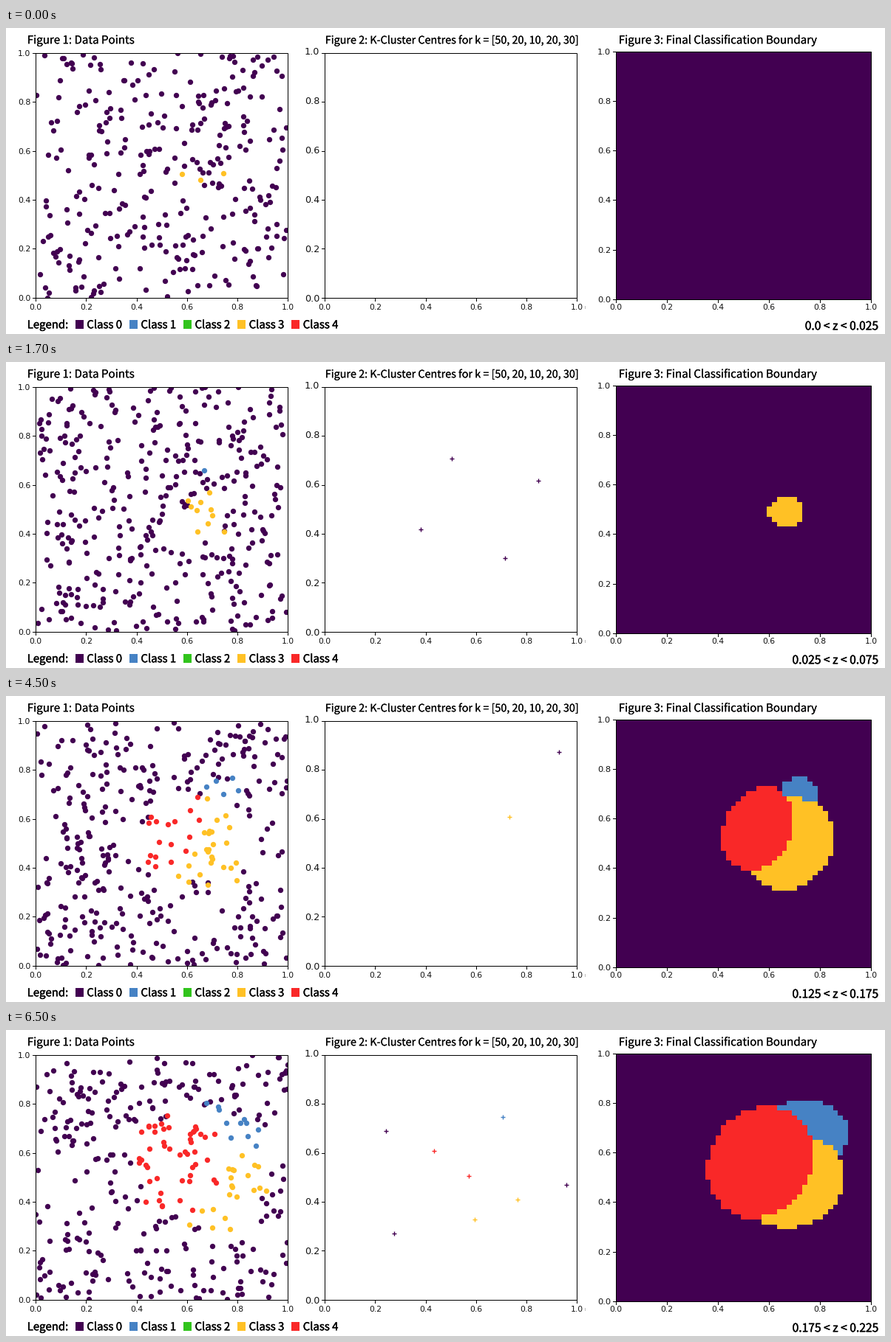
Write a matplotlib script that moves like this. It is 1189 by 415 pixels and loops after 8000 ms.

```python
import numpy as np
import matplotlib.pyplot as plt
from matplotlib.animation import FuncAnimation
from matplotlib.colors import ListedColormap
from matplotlib.patches import Rectangle
from matplotlib.patheffects import withStroke

W, H, DPI = 1189, 415, 100
PX = 72 / DPI
CELLS = 50
COLORS = ["#420051", "#4682c4", "#31c41c", "#ffc125", "#f92828"]
PURPLE, BLUE, GREEN, YELLOW, RED = range(5)

# left, top, right, bottom of each panel
POINTS_BOX = (40.5, 33.5, 381.5, 365.5)
CENTRES_BOX = (431.5, 33.5, 772.5, 365.5)
REGION_BOX = (825.5, 31.5, 1170.5, 367.5)

fig = plt.figure(figsize=(W / DPI, H / DPI), dpi=DPI, facecolor="white")
ax = fig.add_axes([0, 0, 1, 1])
# quarter-pixel nudge so that snapped lines land on the intended pixels
ax.set_xlim(0.25, W + 0.25)
ax.set_ylim(H - 0.25, -0.25)
ax.axis("off")


def label(x, y, s, size, ha="left", heavy=0.1):
    t = ax.text(x, y, s, ha=ha, va="baseline", color="black",
                fontsize=size * PX, family="Noto Sans CJK JP")
    t.set_path_effects([withStroke(linewidth=heavy * PX, foreground="black")])
    return t


def number(x, y, value, size, ha):
    ax.text(x, y, f"{value:.1f}", ha=ha, va="baseline", color="#111111",
            fontsize=size * PX, family="DejaVu Sans")


def panel(box, title, title_x, title_size, y_size=11, spread=0):
    x0, y0, x1, y1 = box
    ax.add_patch(Rectangle((x0, y0), x1 - x0, y1 - y0, fill=False,
                           ec="black", lw=PX, zorder=5))
    for v in np.linspace(0, 1, 6):
        x, y = to_pixels(box, v, v)
        ax.plot([x, x], [y1, y1 + 4], color="black", lw=PX)
        ax.plot([x0 - 4, x0], [y, y], color="black", lw=PX)
        number(x, 382, v, 10.8, "center")
        number(x0 - 7, y + 4 + spread * (1 - 2 * v), v, y_size, "right")
    label(title_x, 21, title, title_size)


def to_pixels(box, u, v):
    x0, y0, x1, y1 = box
    return x0 + u * (x1 - x0), y1 + v * (y0 - y1)


def clip_to(artist, box):
    x0, y0, x1, y1 = box
    artist.set_clip_path(Rectangle((x0, y0), x1 - x0, y1 - y0,
                                   transform=ax.transData))
    return artist


def classify(x, y, blobs):
    """Class at each place, in cells; later leaning ellipses cover earlier."""
    k = np.full(np.shape(x), PURPLE)
    for c, cx, cy, rx, ry, lean in blobs:
        dy = y - cy
        dx = x - cx - lean * dy
        k[(dx / rx) ** 2 + (dy / ry) ** 2 <= 1] = c
    return k


def data_points(count, blobs, strays, seed):
    """Even random points, coloured by a slightly noisy look at the blobs."""
    rng = np.random.default_rng(seed)
    uv = rng.random((2, count))
    k = classify(*(uv * CELLS + rng.normal(0, 1, uv.shape)), blobs)
    groups = [(c, *to_pixels(POINTS_BOX, *uv[:, k == c]))
              for c in range(len(COLORS))]
    groups += [(c, *np.transpose(xy)) for c, xy in strays.items()]
    return [clip_to(ax.scatter(x, y, s=(7.3 * PX) ** 2, color=COLORS[c],
                               lw=0, zorder=3), POINTS_BOX)
            for c, x, y in groups]


def centre_marks(groups):
    out = []
    for c, xy in groups.items():
        x, y = np.transpose(xy)
        out += ax.plot(x + 0.5, y + 0.5, "+", color=COLORS[c], ms=6.5 * PX,
                       mew=1.4 * PX, zorder=3)
    return out


def region(blobs):
    n = np.arange(CELLS + 1)
    edge = (np.arange(CELLS + 2) - 0.5) / CELLS
    mesh = ax.pcolormesh(*to_pixels(REGION_BOX, edge, edge),
                         classify(*np.meshgrid(n, n), blobs),
                         cmap=ListedColormap(COLORS), vmin=0, vmax=4, zorder=2)
    return [clip_to(mesh, REGION_BOX)]


slices = []


def add_slice(z, count, blobs=(), centres={}, strays={}):
    slices.append(data_points(count, blobs, strays, seed=41 + len(slices))
                  + centre_marks(centres) + region(blobs)
                  + [label(1180, 409, z, 15.6, "right", 0.4)])


panel(POINTS_BOX, "Figure 1: Data Points", 29, 15.1)
panel(CENTRES_BOX, "Figure 2: K-Cluster Centres for k = [50, 20, 10, 20, 30]",
      432, 14.35, y_size=12.8, spread=1.5)
panel(REGION_BOX, "Figure 3: Final Classification Boundary", 829, 15.1,
      y_size=11.5)
ax.add_patch(Rectangle((783, 377), 1, 4, color="#bbbbbb", lw=0))

label(29, 407, "Legend:", 14.9, heavy=0.4)
for k, c in enumerate(COLORS):
    x = 94 + 73.1 * k
    ax.add_patch(Rectangle((round(x), 396), 11, 12, color=c, lw=0))
    label(x + 15.6, 407, f"Class {k}", 14.9, heavy=0.4)

add_slice("0.0 < z < 0.025", 300,
          strays={YELLOW: [(238, 198), (263, 206), (294, 197)]})

add_slice("0.025 < z < 0.075", 370,
          [(YELLOW, 33.2, 24.5, 3.3, 3.3, 0)],
          {PURPLE: [(603, 130), (720, 160), (561, 226), (675, 265)]},
          {BLUE: [(268, 147)],
           YELLOW: [(275, 177), (246, 188), (295, 230)]})

add_slice("0.075 < z < 0.125", 350,
          [(YELLOW, 33.7, 25.3, 8, 8, 0), (RED, 28.5, 28, 4, 5.4, 0.4)],
          {PURPLE: [(455, 81), (547, 58), (664, 61), (463, 194), (459, 314),
                    (556, 336), (657, 344), (749, 316)],
           YELLOW: [(642, 205)]},
          {BLUE: [(220, 117), (331, 146)]})

add_slice("0.125 < z < 0.175", 365,
          [(BLUE, 35.8, 35, 3.7, 3.3, 0), (YELLOW, 33.8, 25, 8.8, 9.3, 0.1),
           (RED, 27.8, 28, 7, 8.3, 0.2)],
          {PURPLE: [(748, 75)], YELLOW: [(681, 163)]})

add_slice("0.175 < z < 0.225", 350,
          [(BLUE, 36.8, 33.6, 8.8, 6.9, 0), (YELLOW, 34.6, 24, 10, 9.2, 0.15),
           (RED, 28.2, 28, 10.3, 11.2, 0.12)],
          {PURPLE: [(514, 136), (525, 275), (758, 209)],
           RED: [(579, 163), (626, 197)], BLUE: [(672, 117)],
           YELLOW: [(634, 256), (692, 229)]})


def update(i):
    # half-second steps: one for the first slice, four for each later one
    current = (i + 3) // 4
    for n, artists in enumerate(slices):
        for artist in artists:
            artist.set_visible(n == current)
    return []


anim = FuncAnimation(fig, update, frames=16, interval=500, repeat=True,
                     repeat_delay=0, blit=False)
plt.show()
```
